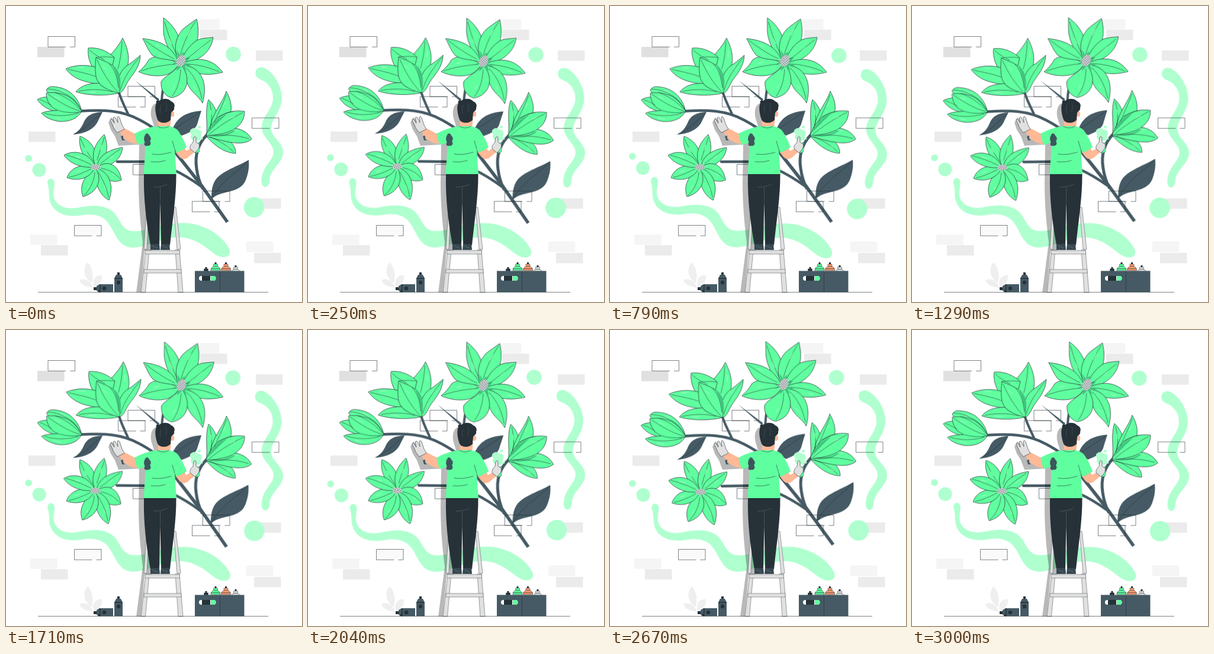
Recreate the animation shown at these times as an HTML page. Size 500 by 500 pixels, loop 3040 ms.

```html
<!DOCTYPE html>
<html lang="en">
<head>
<meta charset="utf-8">
<title>Mural painter</title>
<style>
  html, body { margin: 0; width: 100%; height: 100%; overflow: hidden; background: #fff; }
  svg { display: block; width: 100%; height: 100%; }
  .blobs { fill: #afffcf; transform-origin: 250px 247px; animation: wind 3040ms linear infinite; }
  .plant { transform-origin: 234px 193px; animation: wind 1520ms linear infinite; }
  @keyframes wind {
    0%, 100% { transform: rotate(0deg); }
    25% { transform: rotate(1deg); }
    75% { transform: rotate(-1deg); }
  }
  .pale { fill: #f5f5f5; }
  .grey { fill: #ebebeb; }
  .line { fill: none; stroke: #263238; stroke-width: .6; }
  .wood { fill: none; stroke: #455a64; stroke-linecap: round; }
  .slate { fill: #455a64; }
  .ink { fill: #263238; }
  .petals { fill: #5fff9f; stroke: #263238; stroke-width: .75; stroke-linejoin: round; }
  .shade { fill: #3fc47e; stroke: none; }
  .vein { fill: none; stroke: #263238; stroke-width: .6; stroke-linecap: round; }
  .shine { fill: none; stroke: #b4ffd3; stroke-width: .9; stroke-linecap: round; }
  .shadow { fill: #000; opacity: .28; }
  .skin { fill: #ffb996; }
  .glove { fill: #e0e0e0; stroke: #263238; stroke-width: .6; stroke-linejoin: round; }
  .shirt { fill: #5fff9f; }
  .metal { fill: #e0e0e0; stroke: #5b6469; stroke-width: .6; }
</style>
</head>
<body>
<svg viewBox="0 0 500 500">
  <defs>
    <pattern id="seeds" width="3" height="3" patternUnits="userSpaceOnUse" patternTransform="rotate(25)">
      <rect width="3" height="3" fill="#37474f"/>
      <circle cx="1.5" cy="1.5" r="1.4" fill="#ebebeb"/>
    </pattern>
    <path id="brick" d="M0 0h45.500v17.500h-45.500z"/>
    <path id="frame" d="M0 17.700V0H45.500V17.700M0 17.700H30M37 17.700H45.500"/>
    <g id="cap">
      <path d="M-8 14C-8 9-5 6.500 0 6.500S8 9 8 14Z" stroke="#263238" stroke-width=".6"/>
      <path d="M-3.500 3H3.500V6.500H-3.500Z" stroke="#263238" stroke-width=".5"/>
      <path class="ink" d="M-1.500 0H1.500V3H-1.500ZM-8 10.500H8V11.200H-8Z"/>
    </g>
  </defs>

  <g class="grey">
    <use href="#brick" x="53" y="69" fill="#e0e0e0"/>
    <use href="#brick" x="315" y="22" class="pale"/>
    <use href="#brick" x="328" y="40"/>
    <use href="#brick" x="422" y="75"/>
    <use href="#brick" x="38" y="212"/>
    <use href="#brick" x="41" y="386" class="pale"/>
    <use href="#brick" x="59" y="404"/>
    <use href="#brick" x="406" y="398" class="pale"/>
    <use href="#brick" x="419" y="417"/>
    <use href="#brick" x="419" y="325"/>
    <use href="#brick" x="115.500" y="370.500" fill="#fafafa"/>
  </g>

  <g class="blobs">
    <circle cx="384" cy="81.500" r="12.800"/>
    <circle cx="56" cy="277" r="11.500"/>
    <circle cx="38" cy="257.500" r="5.800"/>
    <circle cx="419" cy="340" r="17.300"/>
    <path d="M421.500 114C421 104 431 101 439 106C453 114 466 136 466 155C466 177 448 190 448 207C448 222 468 230 468 247C468 266 446 274 445 295C444 309 432 309 431.500 296C432 270 452 262 452 246C452 232 432 222 432 205C432 186 451 175 451 155C451 140 443 131 434 126C427 123 421.500 121 421.500 114Z"/>
    <path d="M70 300C69 289 82 289 82 300C81 312 77 319 84 330C92 341 106 343 120 341C140 337 160 335 176 344C193 354 192 377 212 380C236 383 262 366 300 366.500C335 367 366 388 377 410C381 421 374 426 362 423.500C345 418 332 396 300 391C265 388 240 409 212 408C188 406 184 381 173 367C163 353 146 350 125 354C102 357 84 350 77 336C70 322 75 314 70 300Z"/>
  </g>

  <g class="line">
    <use href="#frame" x="71" y="51.500"/>
    <use href="#frame" x="206" y="135.500"/>
    <use href="#frame" x="189.500" y="153"/>
    <use href="#frame" x="415.500" y="189"/>
    <use href="#frame" x="214.500" y="267.500"/>
    <use href="#frame" x="115.500" y="370.500"/>
  </g>

  <g class="plant">
    <g class="wood">
      <path stroke-width="4.600" d="M126 177.500C165 175 195 176 225 192C240 200 256 208 275 233"/>
      <path stroke-width="5.600" stroke-linecap="butt" d="M270 226L286 247L330 303L374 365"/>
      <path stroke-width="4.400" d="M188 263H232C262 263 300 283 330 305"/>
      <path stroke-width="5" d="M340 217C325 232 318 250 322 275C324 290 328 300 332 308"/>
      <path stroke-width="4" d="M266 135C263 152 261 170 262 200M191 147C196 162 202 173 206 182"/>
    </g>
    <g class="slate">
      <path d="M218 126L259 157.500L257 161Z"/>
      <path d="M163 179C145 180 137 185 132 195C127 207 122 212 113 217C133 216 150 208 156 193Z"/>
      <path d="M330 177C300 179 287 192 281 209L297 219C310 214 322 208 324 196Z"/>
      <path d="M410 260C385 274 361 280 352 297C347 307 347 317 347 327C360 310 395 319 405 294C410 281 411 271 410 260Z"/>
    </g>
    <path class="vein" d="M161 181C148 192 138 205 117 216M328 179L284 208M409 262C385 285 363 297 348 324"/>

    <g class="petals">
      <path d="M290 90C276 78 268 62 266 44V20C278 28 290 43 293 58C295 70 294 82 290 90Z"/>
      <path d="M290 89C283 72 286 54 298 40C305 33 314 28 322 22C326 40 326 55 319 66C312 77 302 84 296 90Z"/>
      <path d="M297 92C301 78 311 65 324 57C332 54 342 54 350 53C347 75 330 92 300 98Z"/>
      <path d="M299 97C322 86 348 87 366 112C347 117 320 119 300 101Z"/>
      <path d="M299 100C326 102 343 125 332 164C326 152 312 146 306 130C302 118 299 109 297 101Z"/>
      <path d="M297 101C312 120 309 149 280 155C267 152 261 141 262 128C268 117 286 112 292 99Z"/>
      <path d="M291 98C278 89 255 79 241 91C237 99 230 106 224 111C238 118 262 121 276 114C284 109 289 104 291 98Z"/>
      <path d="M290 94C272 89 258 91 247 83C240 75 236 64 231 55C250 57 264 62 274 70C282 77 288 85 290 94Z"/>
      <path class="shade" d="M290 91L283 81L290 84L288 74L294 83L301 77L299 88L311 87L303 97L314 101L302 101L305 110L297 102L288 110L290 98L280 99L287 95Z"/>
    </g>
    <path class="vein" d="M288 82C280 65 273 45 268 27M295 81C300 63 309 42 320 26M304 90C318 80 332 68 346 57M306 98C326 99 344 104 360 111M305 105C320 120 327 138 331 157M295 107C294 125 290 140 281 152M285 98C267 100 245 103 228 110M284 89C267 81 250 70 235 58"/>
    <path class="shine" d="M276 55L280 64M311 40L306 50M331 70L324 76M336 108L344 111M316 134L320 140M250 97L258 95M252 65L260 69M285 134L282 140"/>
    <ellipse cx="295.500" cy="92.500" rx="7.500" ry="10.500" transform="rotate(25 295.500 92.500)" fill="url(#seeds)"/>

    <g class="petals">
      <path d="M168 95C174 83 189 71 197 54C206 71 210 89 204 106L191 126L172 108Z"/>
      <path d="M155 114C143 104 137 86 139 71C156 69 173 77 183 87L178 108Z"/>
      <path d="M157 132C138 129 115 126 101 106C119 98 141 99 156 105Z"/>
      <path d="M191 147C185 125 193 106 210 97C216 92 222 88 227 83C226 105 213 116 205 129C200 139 197 146 191 147Z"/>
      <path d="M191 147C172 152 140 152 118 145C127 133 145 129 163 131Z"/>
      <path d="M152 87C167 94 188 98 191 121C193 133 192 141 191 147C173 143 155 135 152 119C150 107 151 97 152 87Z"/>
      <path class="shade" d="M191 145C190 128 187 112 178 98C194 108 196 128 191 145ZM189 146C170 143 158 136 153 127C162 139 176 143 189 146Z"/>
    </g>
    <path class="vein" d="M196 60C195 78 193 92 189 106M141 74C148 82 158 86 166 91M105 107C122 111 138 114 151 119M225 87C212 103 199 120 193 142M123 144C142 140 162 140 180 145M154 91C162 110 174 130 188 144M152 87C160 86 172 85 182 87M175 98C184 108 188 120 190 138"/>
    <path class="shine" d="M200 76L200 87M122 104L132 104M163 102L170 107M212 101L207 108M140 145L152 146"/>

    <g class="petals">
      <path d="M128 178C123 156 108 137 78 136C74 136 70 138 68 142C72 150 84 156 95 162Z"/>
      <path d="M84 178C70 175 59 168 53 158C63 152 78 152 90 160Z"/>
      <path d="M60 181C72 175 95 176 127 179C121 190 107 196 90 195C76 193 66 188 60 181Z"/>
      <path d="M68 147C92 143 118 154 128 178C110 183 86 179 76 169C70 162 68 154 68 147Z"/>
      <path class="shade" d="M127 177C117 160 106 153 95 148C112 151 122 162 127 177ZM126 180C106 183 86 179 78 171C90 179 108 179 126 180Z"/>
    </g>
    <path class="vein" d="M70 140C96 141 115 155 126 174M57 158C66 161 70 164 76 167M65 181C84 187 104 186 122 181M71 149C88 161 106 172 124 177M82 146C100 152 116 164 126 176"/>
    <path class="shine" d="M92 142L101 147M82 153L91 157M80 188L92 191"/>

    <g class="petals">
      <path d="M151 271C136 263 121 244 125 220C143 226 155 243 154 270Z"/>
      <path d="M151 270C142 249 151 231 166 217C174 238 171 256 157 270Z"/>
      <path d="M154 270C157 252 174 242 197 239C195 259 178 271 156 274Z"/>
      <path d="M155 271C177 258 192 273 195 294C178 301 163 290 153 276Z"/>
      <path d="M154 274C175 281 183 304 174 328C158 320 150 300 150 276Z"/>
      <path d="M152 275C164 295 153 316 130 322C123 303 133 287 148 274Z"/>
      <path d="M150 274C141 291 122 297 103 290C109 272 129 266 148 271Z"/>
      <path d="M149 272C130 274 109 268 98 252C115 242 139 247 151 270Z"/>
    </g>
    <path class="vein" d="M148 262C139 250 131 237 126 224M154 260C158 246 163 233 166 222M160 266C172 257 184 247 193 242M161 274C174 276 186 284 193 292M156 281C165 295 171 310 173 323M150 281C149 297 141 311 132 320M144 275C132 281 119 287 107 289M144 268C130 261 115 255 102 252"/>
    <path class="shine" d="M133 239L137 246M162 235L160 243M181 253L175 258M178 282L184 287M166 304L169 311M140 304L137 309M117 281L125 278M117 254L125 256"/>
    <ellipse cx="151.500" cy="272" rx="8.500" ry="5.200" fill="url(#seeds)"/>

    <g class="petals">
      <path d="M338 219C342 202 335 180 342 158C352 167 360 183 357 200Z"/>
      <path d="M345 209C346 183 366 164 372 144C381 160 383 175 377 187Z"/>
      <path d="M338 220C362 216 388 226 388 249C366 248 349 232 338 220Z"/>
      <path d="M338 219C360 203 401 198 415 225C399 238 370 229 338 220Z"/>
      <path d="M338 219C347 190 373 173 403 178C403 201 384 217 338 219Z"/>
      <path class="shade" d="M340 215C349 196 360 187 374 182C360 194 350 206 340 215ZM343 220C360 220 380 215 391 206C382 218 364 223 343 220Z"/>
    </g>
    <path class="vein" d="M344 163C348 180 349 193 344 207M372 150C366 167 358 182 352 196M384 246C372 235 358 226 344 221M410 224C390 218 368 217 346 219M400 180C380 190 358 204 343 217M357 188C366 183 374 180 384 178"/>
    <path class="shine" d="M346 176L347 184M370 163L367 170M386 187L378 190M384 209L393 211M372 237L377 241"/>
  </g>

  <g class="line">
    <use href="#frame" x="332.500" y="312.500"/>
    <use href="#frame" x="314.500" y="330"/>
  </g>

  <path class="shadow" d="M258 163C245 164 243 178 246 190L250 203L216 216L200 212L178 188L173 197L177 209L184 220L190 236L225 234L224 300C224 340 228 375 231 400L220 484H228L234 413H246V300L262 202Z"/>

  <!-- spray -->
  <g fill="#afffcf">
    <path d="M313 208C318 204 322 208 325 209C331 209 332 216 329 220C331 227 325 229 320 227C314 228 310 222 313 217C310 213 310 210 313 208Z"/>
    <circle cx="326.500" cy="204.500" r="2.500"/><circle cx="331" cy="224" r="1.500"/>
  </g>

  <!-- ladder -->
  <g class="metal">
    <path d="M237 345L233 411H238L241 345ZM283 340L289 411H295L287 340Z"/>
    <path d="M236 412L228 484H235.500L242 412ZM286 412L291 484H299L293 412Z"/>
    <path d="M235 413H293.500V419H235ZM233 445H296V451H233Z"/>
  </g>

  <!-- painter -->
  <g class="skin">
    <path d="M192 213L201 207L222 218L224 234L211 231Q198 225 192 213Z"/>
    <path d="M286 246L301 238L304 245L313 240L319 246L306 257Q299 261 293 255Z"/>
    <path d="M257 190H279L277 206H256Z"/>
    <ellipse cx="281" cy="182.500" rx="3.200" ry="4.800"/>
  </g>
  <path class="slate" d="M194 220L198 219V224L201 227L196 227Z"/>
  <path class="glove" d="M188 214C184 209 181 206 180 201L176 193Q176 190 179 192L183 198L181 189Q183 186 185 189L189 197L188 188Q190 185 192 189L196 201L200 208Z"/>
  <path fill="#5fff9f" stroke="#263238" stroke-width=".4" d="M321 233L327 230V246L321 249Z"/>
  <path class="glove" d="M311 241C310 235 314 233 316 230L317 222Q319 219 321 222L321 230L326 233C328 239 323 245 319 248Z"/>
  <path class="shirt" d="M217 216C230 208 245 204 256 203H275C285 205 290 208 293 214C299 224 303 232 305 239L289 248L285 242L288 285H233C233 265 236 250 235 231L222 235Z"/>
  <path class="vein" d="M235 231L234 219M285 242L281 228M247 250C258 252 268 250 279 247M245 263C256 264 262 263 269 261M256 203C261 207 270 207 275 203"/>
  <path fill="#3d565c" d="M235 219C235 214 241 214 242 219C246 222 245 227 243 228C246 232 244 237 239 236C234 238 232 233 235 230C232 226 233 222 235 219Z"/>
  <path class="ink" d="M256 192C252 181 251 170 254 164C252 161 256 158 259 160C265 155 275 156 279 161C284 163 286 167 284 172C285 177 280 177 279 181L278 192C275 198 260 200 256 192Z"/>
  <path fill="none" stroke="#4c5b63" stroke-width=".6" d="M262 167C260 172 260 176 261 181M270 164C272 169 271 174 270 179"/>
  <path class="ink" d="M233 284H287.500C288 320 281 365 277 404H262L260.500 330L259 404H244C237 365 232 325 233 284Z"/>
  <path fill="none" stroke="#54636b" stroke-width=".7" d="M260.500 306V330M249 306C258 306 267 304 273 301"/>
  <path fill="#37474f" d="M244 402H259L260 412H244ZM262 402H276L277 412H261Z"/>
  <path fill="none" stroke="#78909c" stroke-width=".5" d="M247 405L256 409M264 405L273 409"/>

  <!-- floor -->
  <path class="line" d="M54 483.500H443"/>
  <g fill="#efefef">
    <path d="M145 468C132 460 128 444 138 433C147 442 148 456 145 468Z"/>
    <path d="M148 474C145 462 152 453 162 455C163 465 157 472 148 474Z"/>
    <path d="M147 476C138 474 127 473 124 463C135 458 144 466 147 476Z"/>
  </g>
  <g class="slate">
    <path d="M158 470H181V483.500H158L153 481V473Z"/>
    <path d="M183 460H197V483.500H183ZM186 454H194L197 460H183Z"/>
    <path class="ink" d="M148 475H153V480H148ZM188 450H192V454H188ZM183 459.500H197V461H183ZM158 470H159.500V483.500H158Z"/>
    <circle class="ink" cx="190" cy="467" r="3.200"/>
    <circle class="ink" cx="166" cy="477" r="3.200"/>
    <path class="ink" d="M155 483L157 479L160 483.500Z"/>
  </g>
  <use href="#cap" x="338" y="441" fill="#263238"/>
  <use href="#cap" x="354" y="433" fill="#5fff9f"/>
  <use href="#cap" x="371.500" y="433" fill="#ff9a70"/>
  <use href="#cap" x="388" y="438" fill="#e0e0e0"/>
  <path class="slate" d="M319 447.500H402.500V483.500H319Z"/>
  <path class="vein" d="M361.500 448V483"/>
  <rect x="326" y="456" width="28.500" height="8" rx="4" fill="#fff"/>
  <path class="ink" d="M331 456H345V464H331Z"/>
  <path fill="#5fff9f" d="M346 456H350.500A4 4 0 0 1 350.500 464H346Z"/>
</svg>
</body>
</html>
```
